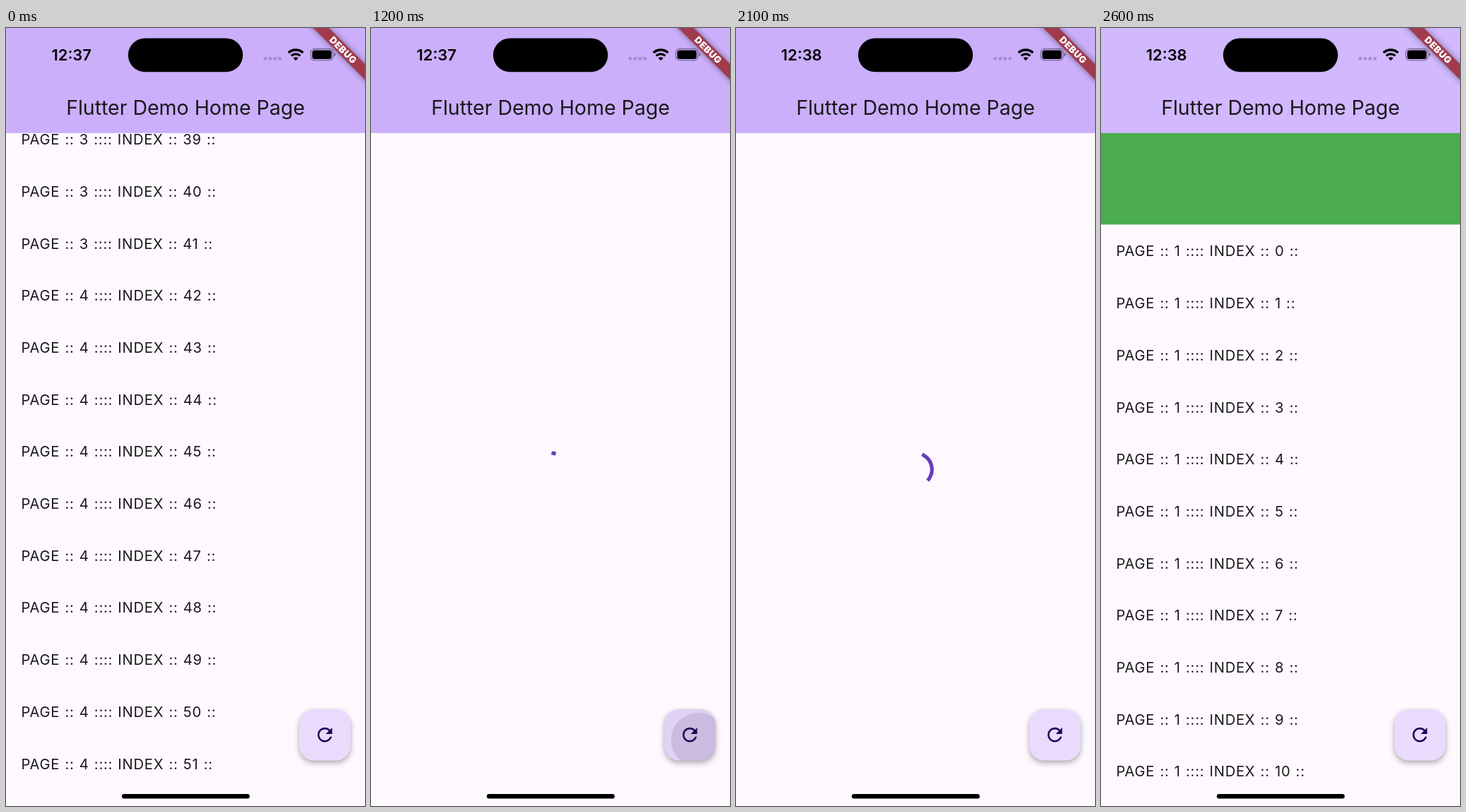
An HTML page that plays this animation: 508 px wide and 1102 px high, repeating every 2700 ms.

```html
<!DOCTYPE html>
<html lang="en">
<head>
<meta charset="utf-8">
<title>Paged list</title>
<style>
  html, body { margin: 0; width: 100%; height: 100%; overflow: hidden; background: #fef9fe; }
  svg { display: block; width: 508px; height: 1102px; }
  text { font-family: Inter, Roboto, sans-serif; font-optical-sizing: none; fill: #1a181c; }
  .row { font-size: 20.2px; letter-spacing: .75px; word-spacing: .8px; }
  .title { font-size: 28.5px; text-anchor: middle; }
  .clock { font-size: 21.9px; font-weight: 600; text-anchor: middle; fill: #000; }
  .debug { font-size: 13.2px; font-weight: 900; letter-spacing: .5px; text-anchor: middle; fill: #fff; }
  .banner { filter: drop-shadow(0 0 4px rgba(0, 0, 0, .45)); }
  .button { filter: drop-shadow(0 4px 4px rgba(0, 0, 0, .24)) drop-shadow(0 1px 2px rgba(0, 0, 0, .12)); }
</style>
</head>
<body>
<svg viewBox="0 0 508 1102">
  <defs>
    <clipPath id="buttonShape"><rect x="415" y="965" width="72.5" height="72.5" rx="20.7"/></clipPath>
  </defs>
  <rect width="508" height="1102" fill="#fef9fe"/>
  <rect id="green" y="148" width="508" height="130.4" fill="#4bad4f"/>
  <g id="rows"></g>
  <circle id="spinner" r="23.27" pathLength="360" fill="none" stroke="#693cb8"
          stroke-width="5.17" stroke-linecap="square"/>

  <rect id="header" width="508" height="148.8"/>
  <text class="title" x="254" y="123">Flutter Demo Home Page</text>

  <text id="clock" class="clock" x="92.7" y="46"></text>
  <rect x="172.8" y="14.4" width="162.4" height="47.8" rx="23.9"/>
  <g fill="#a58ccb">
    <rect x="364.5" y="41" width="4.6" height="4.6" rx="1.4"/>
    <rect x="371.5" y="41" width="4.6" height="4.6" rx="1.4"/>
    <rect x="378.4" y="41" width="4.6" height="4.6" rx="1.4"/>
    <rect x="385.3" y="41" width="4.6" height="4.6" rx="1.4"/>
  </g>
  <g id="wifi" transform="translate(410 46.3)" fill="none" stroke="#000"></g>
  <rect x="431.2" y="29.5" width="31.6" height="16.4" rx="5.4" fill="none" stroke="#000" stroke-opacity=".4" stroke-width="1.3"/>
  <rect x="433.3" y="31.5" width="27.4" height="12.4" rx="3.5"/>
  <path d="M464.4 35v5.6q2-.8 2-2.8t-2-2.8z" opacity=".45"/>

  <g transform="translate(508 0) rotate(45)">
    <rect class="banner" x="-60" y="36.2" width="120" height="15.5" fill="#a03a4c"/>
    <text class="debug" x=".3" y="48.7">DEBUG</text>
  </g>

  <rect class="button" x="415" y="965" width="72.5" height="72.5" rx="20.7" fill="#eadbfd"/>
  <g id="press" clip-path="url(#buttonShape)">
    <rect x="415" y="965" width="72.5" height="72.5" fill-opacity=".04"/>
    <circle id="ripple" fill="#21003c" fill-opacity=".11"/>
  </g>
  <path transform="translate(435.7 985.7) scale(1.2926)" fill="#22055a"
        d="M17.65 6.35C16.2 4.9 14.21 4 12 4c-4.42 0-7.99 3.58-7.99 8s3.57 8 7.99 8c3.73 0 6.84-2.55 7.73-6h-2.08c-.82 2.33-3.04 4-5.65 4-3.31 0-6-2.69-6-6s2.69-6 6-6c1.66 0 3.14.69 4.22 1.78L13 11h7V4l-2.35 2.35z"/>
  <rect x="163.8" y="1085.1" width="181" height="6.5" rx="3.25"/>
</svg>
<script>
const LOOP = 2700, STEP = 100;
const TAP = 1100, LOADING = 1200, MINUTE = 1300, LOADED = 2200;
const SPINNER_START = 1157;
const ROW_HEIGHT = 73.7, ROWS_PER_PAGE = 14;

const el = id => document.getElementById(id);
const set = (id, attributes) => {
  for (const name in attributes) el(id).setAttribute(name, attributes[name]);
};
const clamp = v => Math.min(1, Math.max(0, v));
const lerp = (a, b, k) => a + (b - a) * k;

// Cubic bezier (0.4, 0, 0.2, 1)
function fastOutSlowIn(x) {
  let low = 0, high = 1;
  for (let i = 0; i < 24; i++) {
    const m = (low + high) / 2, n = 1 - m;
    if (1.2 * n * n * m + .6 * n * m * m + m ** 3 < x) low = m; else high = m;
  }
  return low * low * (3 - 2 * low);
}

const listRows = (first, count, baseline) => Array.from({ length: count }, (_, i) => {
  const index = first + i, page = Math.floor(index / ROWS_PER_PAGE) + 1;
  return `<text class="row" x="21.4" y="${baseline + i * ROW_HEIGHT}">` +
    `PAGE :: ${page} :::: INDEX :: ${index} ::</text>`;
}).join('');

const wifiArc = (radius, width) => {
  const x = radius * Math.sin(.74), y = -radius * Math.cos(.74);
  return `<path d="M${-x} ${y}A${radius} ${radius} 0 0 1 ${x} ${y}" stroke-width="${width}"/>`;
};
el('wifi').innerHTML = wifiArc(15.3, 3.4) + wifiArc(9.4, 3.3) +
  '<path d="M0 0L-3.5-3.7A5.1 5.1 0 0 1 3.5-3.7Z" fill="#000" stroke="none"/>';

function drawSpinner(elapsed) {
  const cycle = elapsed / 1333 % 1, turn = elapsed / 2222 % 1;
  const head = 270 * fastOutSlowIn(clamp(cycle * 2));
  const tail = 270 * fastOutSlowIn(clamp(cycle * 2 - 1));
  const start = -90 + tail + turn * 360 + cycle * 90;
  set('spinner', {
    transform: `translate(254 625.3) rotate(${start})`,
    'stroke-dasharray': `${Math.max(head - tail, .1)} 400`
  });
}

function drawPress(age) {
  const k = clamp(age / 200);
  set('press', { opacity: age < 0 ? 0 : clamp((300 - age) / 200) });
  set('ripple', { cx: lerp(475.5, 451, k), cy: lerp(1015.6, 1001, k), r: 18.6 + 40 * k });
}

let shownRows = '';
function showRows(markup) {
  if (markup !== shownRows) el('rows').innerHTML = shownRows = markup;
}

function render(t) {
  const loading = t >= LOADING && t < LOADED, loaded = t >= LOADED;
  showRows(loading ? '' : loaded ? listRows(0, 11, 323.4)
    : listRows(39, 13, t < STEP ? 165.1 : 164.5));
  set('green', { visibility: loaded ? 'visible' : 'hidden' });
  set('header', { fill: loaded ? '#d1b8ff' : '#cbaffb' });
  set('spinner', { visibility: loading ? 'visible' : 'hidden' });
  if (loading) drawSpinner(t - SPINNER_START);
  drawPress(t - TAP);
  el('clock').textContent = t < MINUTE ? '12:37' : '12:38';
}

const origin = performance.now();
function tick() {
  const t = (performance.now() - origin) % LOOP;
  render(Math.floor(t / STEP) * STEP);
  requestAnimationFrame(tick);
}
tick();
</script>
</body>
</html>
```
